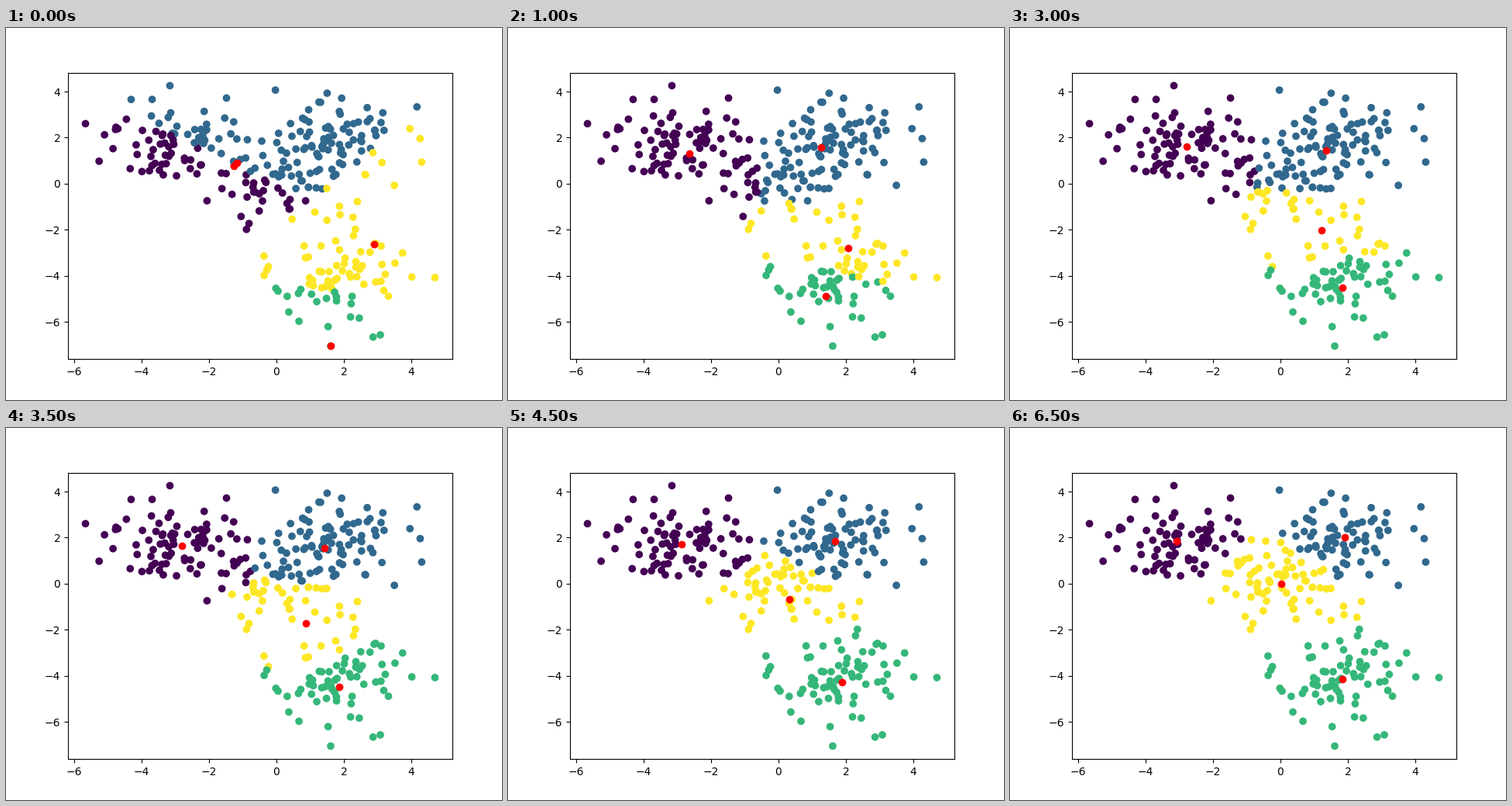
A matplotlib script that plays this animation: 640 by 480 pixels, repeating every 7 s.

```python
import numpy as np
import matplotlib.pyplot as plt
from matplotlib.animation import FuncAnimation

STEPS = 14
STEP_MS = 500
BLOBS = [(0, 0), (2, 2), (-3, 2), (2, -4)]
PER_BLOB = 75
# Rough seeds; each snaps to its nearest data point.
SEEDS = [(-1.26, 0.75), (-1.17, 0.91), (2 - 0.38, -7.05), (2.88, -2.67)]


def make_points():
    rng = np.random.RandomState(0)
    pts = np.vstack([rng.normal(loc=c, scale=1, size=(PER_BLOB, 2)) for c in BLOBS])
    order = np.arange(len(pts))
    rng.shuffle(order)
    return pts[order]


def distances(a, b):
    return np.linalg.norm(a[:, None] - b[None], axis=2)


def lloyd(pts, centers, steps):
    """Return (centers, labels) for every k-means iteration."""
    states = []
    for _ in range(steps):
        labels = distances(pts, centers).argmin(axis=1)
        states.append((centers, labels))
        centers = np.array([pts[labels == k].mean(axis=0) for k in range(len(centers))])
    return states


points = make_points()
start = points[distances(np.array(SEEDS), points).argmin(axis=1)]
states = lloyd(points, start, STEPS)

fig, ax = plt.subplots(figsize=(6.4, 4.8), dpi=100)
dots = ax.scatter(points[:, 0], points[:, 1], c=states[0][1],
                  cmap="viridis", vmin=0, vmax=len(BLOBS) - 1)
means = ax.scatter(start[:, 0], start[:, 1], c="r")


def update(i):
    centers, labels = states[i]
    dots.set_array(labels)
    means.set_offsets(centers)
    return dots, means


anim = FuncAnimation(fig, update, frames=STEPS, interval=STEP_MS,
                     repeat=True, repeat_delay=0, blit=False)
plt.show()
```
